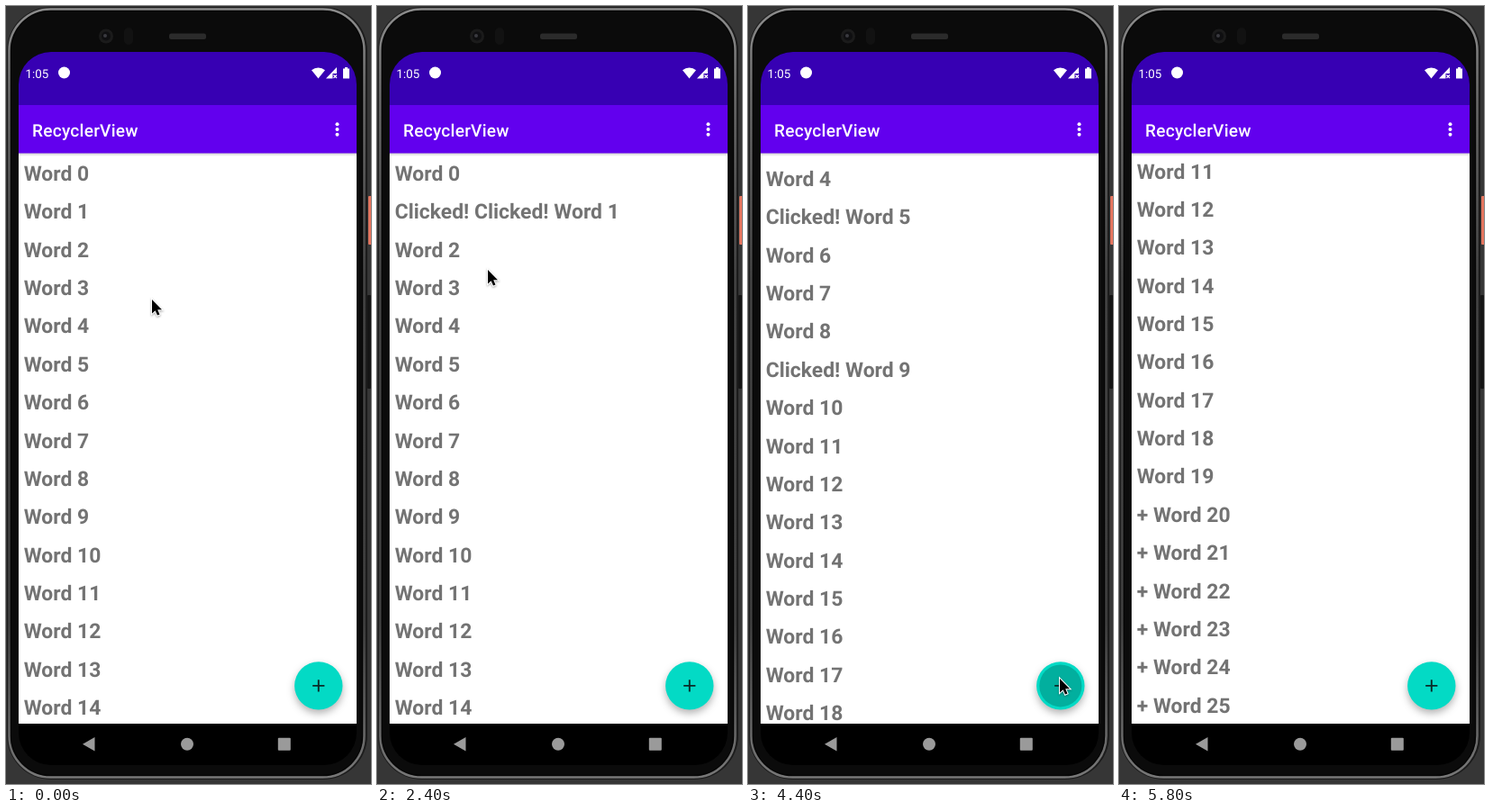
Recreate the animation shown at these times as an HTML page. Size 405x864 px, loop 5.9 s.

```html
<!DOCTYPE html>
<html lang="en">
<head>
<meta charset="utf-8">
<title>RecyclerView</title>
<style>
  html, body { margin: 0; width: 100%; height: 100%; overflow: hidden; background: #363636; }
  svg { display: block; width: 405px; height: 864px; font-family: Roboto, sans-serif; text-rendering: geometricPrecision; }
  #rows { font-size: 22.9px; font-weight: 700; fill: #737373; }
  #title { font-size: 19.1px; font-weight: 500; letter-spacing: .0125em; }
  #fab { filter: drop-shadow(0 4px 4px rgba(0, 0, 0, .3)); }
  #cursor { paint-order: stroke; filter: drop-shadow(0 1px 1px rgba(0, 0, 0, .35)); }
</style>
</head>
<body>
<svg viewBox="0 0 405 864">
  <defs>
    <clipPath id="screen"><rect x="14" y="51" width="375" height="792" rx="36"/></clipPath>
    <clipPath id="list"><rect x="14" y="163" width="375" height="634"/></clipPath>
    <linearGradient id="shade" x2="0" y2="1">
      <stop stop-opacity=".2"/><stop offset="1" stop-opacity="0"/>
    </linearGradient>
    <linearGradient id="rim" x2="0" y2="1">
      <stop stop-color="#8c8c8c"/><stop offset=".12" stop-color="#6a6a6a"/>
      <stop offset=".35" stop-color="#444"/><stop offset=".8" stop-color="#404040"/>
      <stop offset="1" stop-color="#777"/>
    </linearGradient>
  </defs>

  <!-- phone body -->
  <rect width="405" height="864" fill="#363636"/>
  <rect x="402" y="211" width="4" height="54" rx="1" fill="#e4755f"/>
  <rect x="401" y="321" width="4" height="104" rx="1" fill="#151515"/>
  <rect x="1" y="1" width="400" height="858" rx="49" fill="#1c1c1c"/>
  <rect x="3.5" y="3.5" width="394" height="853" rx="46" fill="#0b0b0b" stroke="url(#rim)" stroke-width="2.500"/>
  <rect x="5.500" y="5.500" width="390" height="849" rx="44" fill="#0b0b0b" stroke="#050505"/>
  <circle cx="111" cy="33.500" r="8" fill="#1b1b1b"/>
  <circle cx="111" cy="33.500" r="5" fill="#0f0f11"/>
  <circle cx="110" cy="33" r="2" fill="#3a3a40"/>
  <rect x="131" y="24" width="10" height="19" rx="5" fill="#121212"/>
  <rect x="181" y="30.500" width="41" height="6.500" rx="2.500" fill="#2b2b2b"/>

  <g clip-path="url(#screen)">
    <rect x="14" y="51" width="375" height="792" fill="#000"/>
    <rect x="14" y="163" width="375" height="634" fill="#fff"/>
    <g clip-path="url(#list)">
      <g id="rows"></g>
      <path id="glow" fill="#6200ee" fill-opacity=".1"/>
      <rect x="14" y="163" width="375" height="4" fill="url(#shade)"/>
    </g>

    <!-- bars -->
    <rect x="14" y="51" width="375" height="59" fill="#3700b3"/>
    <rect x="14" y="110" width="375" height="53.500" fill="#6200ee"/>
    <g fill="#fff">
      <text x="21.500" y="79.500" font-size="13.400">1:05</text>
      <circle cx="64.500" cy="74" r="6.500"/>
      <path d="M346.500 80.500L339 71.200a11.500 11.500 0 0 1 15 0z"/>
      <path d="M367 68v7h-4.500v5.500h-7.500z"/>
      <path d="M363.500 76.500l3.500 3.500m0-3.500l-3.500 3.500" stroke="#fff" stroke-width="1.200"/>
      <path d="M376 68h3v1.500h2v11h-7v-11h2z"/>
      <text id="title" x="29" y="145">RecyclerView</text>
      <circle cx="367.500" cy="131.300" r="2"/>
      <circle cx="367.500" cy="137" r="2"/>
      <circle cx="367.500" cy="142.700" r="2"/>
    </g>
    <g fill="#9a9a9a">
      <path d="M85 819.800l13.500-7.800v15.600z"/>
      <circle cx="201" cy="819.800" r="7"/>
      <rect x="301.800" y="812.800" width="14" height="14" rx="1"/>
    </g>

    <!-- floating button -->
    <g transform="translate(346.800 754.900)">
      <circle id="fab" r="26.700" fill="#03dac5"/>
      <circle id="ripple"/>
      <path d="M-6.600 0h13.200m-6.600-6.600v13.200" stroke="#0b2b28" stroke-width="1.900"/>
    </g>
  </g>

  <path id="cursor" d="M0 0V15.500L3.600 12.200L6 17.600L8.500 16.500L6.200 11.300H11Z" fill="#000" stroke="#fff" stroke-width="2"/>
</svg>
<script>
  const TICK = 100, LOOP = 5900, PITCH = 42.36, FIRST = 20, TOTAL = 26;
  const $ = id => document.getElementById(id);
  const rows = $('rows'), glow = $('glow'), ripple = $('ripple'), cursor = $('cursor');

  // pointer keys: tick, x, y
  const path = [
    [0, 162, 326], [6, 156, 235], [15, 156, 235], [20, 159, 205], [21, 160, 206], [23, 160, 206],
    [24, 123, 293], [28, 123, 293], [30, 116, 312], [31, 108, 393], [32, 104, 470], [33, 102, 538],
    [34, 102, 577], [35, 102, 520], [36, 101, 450], [37, 101, 404], [38, 101, 404], [39, 392, 813],
    [40, 388, 774], [41, 362, 758], [42, 346, 747], [53, 346, 747], [54, 352, 400], [55, 355, 46], [56, 358, 16]
  ];
  // taps on list rows: tick, word
  const taps = [[17, 1], [23, 1], [30, 3], [31, 5], [38, 9]];
  // ticks at which the button adds a word
  const adds = [45, 47, 48, 50, 52, 53];
  const drag = { 35: 57, 36: 122 };
  const glowDepth = { 32: 8, 33: 19 };

  const texts = Array.from({ length: TOTAL }, (_, i) => {
    const el = document.createElementNS('http://www.w3.org/2000/svg', 'text');
    el.setAttribute('x', 19.7);
    el.setAttribute('y', 194 + PITCH * i);
    return rows.appendChild(el);
  });

  function pointer(k) {
    const j = path.findIndex(p => p[0] >= k);
    if (j < 1) return path[0].slice(1);
    const [a, x, y] = path[j - 1], [b, u, v] = path[j];
    const f = (k - a) / (b - a);
    return [x + (u - x) * f, y + (v - y) * f];
  }

  function scrollAt(k) {
    const added = adds.filter(a => a <= k).length;
    if (added) return 426 + PITCH * (FIRST + added - 25);
    return k < 35 ? 0 : drag[k] ?? 163.4;
  }

  // ripple radius and darkness
  function press(k) {
    if (k < 44 || k > 54) return [0, 0];
    if (k === 44) return [23.5, .2];
    return [26.7, k === 54 ? .15 : .36];
  }

  function draw(k) {
    texts.forEach((el, i) => {
      const hits = taps.filter(([at, word]) => word === i && at <= k).length;
      const label = 'Clicked! '.repeat(hits) + (i < FIRST ? '' : '+ ') + 'Word ' + i;
      if (el.textContent !== label) el.textContent = label;
    });
    rows.setAttribute('transform', `translate(0 ${-scrollAt(k)})`);

    const depth = glowDepth[k];
    const edge = 163 + depth, radius = 444 * 19 / depth;
    glow.setAttribute('d', depth ? `M14 163H389V${edge}A${radius} ${radius} 0 0 1 14 ${edge}Z` : '');

    const [r, dark] = press(k);
    ripple.setAttribute('r', r);
    ripple.setAttribute('fill-opacity', dark);

    const shown = k <= 56;
    cursor.setAttribute('visibility', shown ? 'visible' : 'hidden');
    if (shown) cursor.setAttribute('transform', `translate(${pointer(k)})`);
  }

  const start = performance.now();
  let last = -1;
  function loop(now) {
    const k = Math.floor(Math.max(0, now - start) % LOOP / TICK);
    if (k !== last) draw(last = k);
    requestAnimationFrame(loop);
  }
  draw(0);
  requestAnimationFrame(loop);
</script>
</body>
</html>
```
